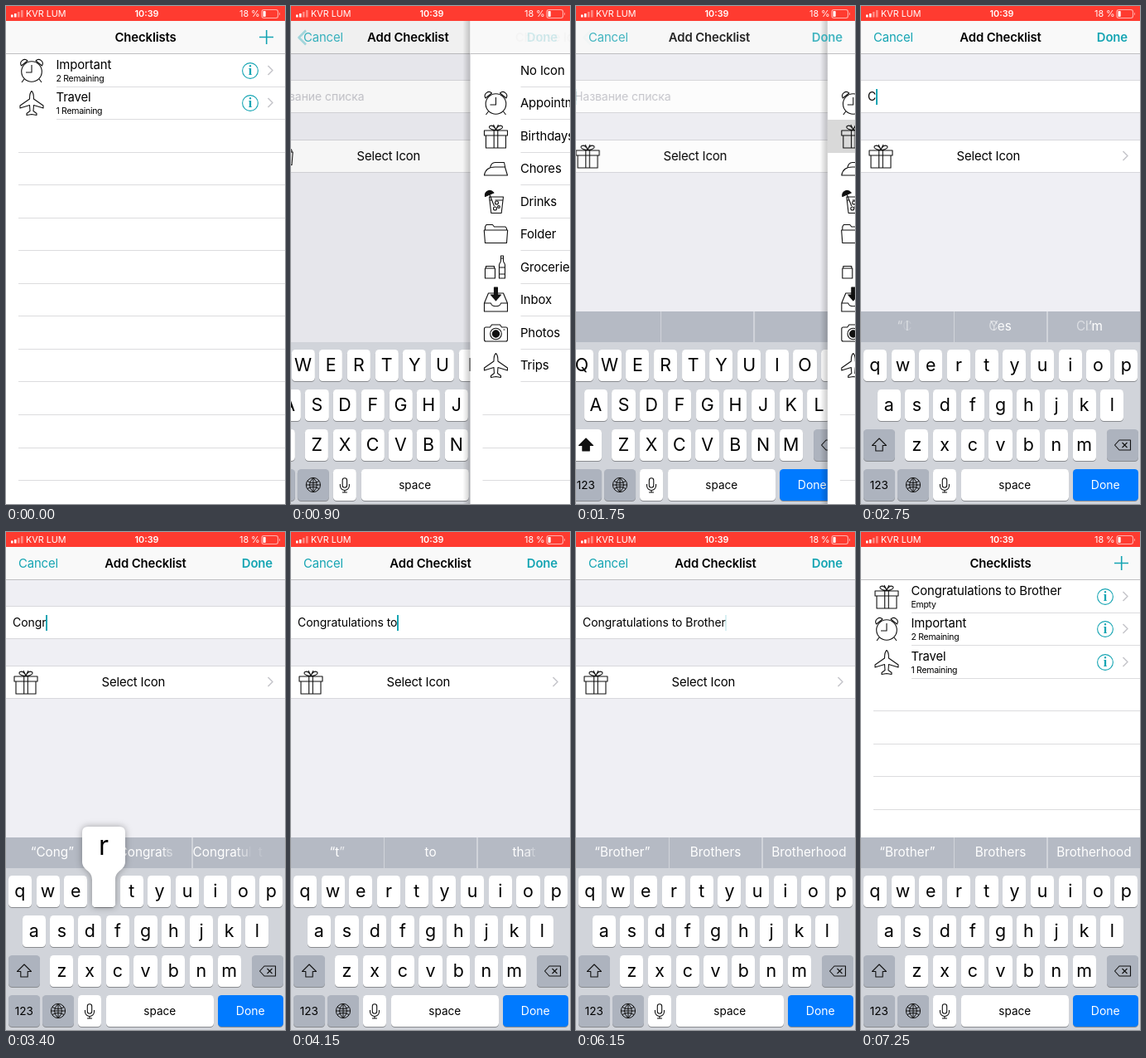
An HTML page for the animation above (7300 ms loop, 337 by 600 pixels).

```html
<!DOCTYPE html>
<html lang="en">
<head>
<meta charset="utf-8">
<title>Checklists</title>
<style>
html, body { margin: 0; width: 100%; height: 100%; overflow: hidden; background: #fff; }
#stage {
  position: relative; width: 337px; height: 600px; overflow: hidden; background: #fff; color: #000;
  font: 14.9px/20px Inter, "Open Sans", sans-serif; letter-spacing: -.14px;
  --tint: #16a5b3;
}
#stage div { position: absolute; box-sizing: border-box; white-space: pre; }
svg { position: absolute; overflow: visible; fill: none; stroke: #111; stroke-width: 1.1; stroke-linejoin: round; }
.solid { fill: #111; }

/* status bar */
#status { left: 0; top: 0; width: 337px; height: 18px; background: #ff3b30; color: #fff; font-size: 10.8px; line-height: 19px; letter-spacing: 0; }
#status div { top: 0; }
#status svg { left: 0; top: 0; stroke: none; fill: #fff; }

/* sliding pages */
.slide, #nav div { animation: 7300ms cubic-bezier(.25,.43,.25,1) infinite; }
.page { left: 0; top: 18px; width: 337px; height: 582px; background: #fff; }
.page::before { content: ""; position: absolute; left: -9px; top: 0; width: 9px; height: 100%; background: linear-gradient(90deg, #0000, #0003); }
.bar { left: 0; top: 0; width: 337px; height: 40px; background: #f9f9f9; border-bottom: 1px solid #bfbfc2; }
#list { animation-name: list; }
#add { animation-name: add; background: #efeff4; }
#icons { animation-name: icons; }
#kb { animation-name: kb; }
@keyframes list {
  0%, 2.055% { transform: none; filter: brightness(1); }
  8.219%, 90.411% { transform: translateX(-101px); filter: brightness(.9); }
  97.26%, 100% { transform: none; filter: brightness(1); }
}
@keyframes add {
  0%, 2.055% { transform: translateX(337px); visibility: hidden; }
  8.219%, 11.644% { transform: translateX(0); filter: brightness(1); visibility: visible; }
  15.89%, 20.548% { transform: translateX(-101px); filter: brightness(.9); visibility: visible; }
  26.712%, 90.411% { transform: translateX(0); filter: brightness(1); visibility: visible; }
  97.26%, 100% { transform: translateX(337px); visibility: hidden; }
}
@keyframes kb {
  0%, 2.055% { transform: translateX(337px); }
  8.219%, 11.644% { transform: translateX(0); }
  15.89%, 20.548% { transform: translateX(-101px); }
  26.712%, 100% { transform: translateX(0); }
}
@keyframes icons {
  0%, 11.644% { transform: translateX(337px); visibility: hidden; }
  15.89%, 20.548% { transform: translateX(0); visibility: visible; }
  26.712%, 100% { transform: translateX(337px); visibility: hidden; }
}

/* navigation bar items */
#nav { left: 0; top: 18px; width: 337px; height: 40px; line-height: 41px; color: var(--tint); }
#nav div { top: 0; height: 40px; }
#nav .title { left: 0; width: 337px; text-align: center; font-weight: 600; color: #000; }
#nav svg { stroke: var(--tint); }
#nav .l-title { animation-name: lTitle; }
#nav .l-plus { animation-name: lPlus; }
#nav .a-title { animation-name: aTitle; }
#nav .a-left { animation-name: aLeft; left: 15px; }
#nav .a-right { animation-name: aRight; right: 15px; font-weight: 600; }
#nav .i-title { animation-name: iTitle; }
#nav .i-back { animation-name: iBack; left: 23.5px; }
#nav .i-chev { animation-name: iChev; left: 8px; }
@keyframes lTitle {
  0%, 2.055% { transform: none; opacity: 1; }
  6% { opacity: 0; }
  8.219%, 90.411% { transform: translateX(-76px); opacity: 0; }
  97.26%, 100% { transform: none; opacity: 1; }
}
@keyframes lPlus { 0%, 2.055% { opacity: 1; } 5%, 92% { opacity: 0; } 97.26%, 100% { opacity: 1; } }
@keyframes aTitle {
  0%, 2.055% { transform: translateX(228px); opacity: 0; }
  8.219%, 11.644% { transform: none; }
  8.219%, 12.4% { opacity: 1; }
  15%, 21.5% { opacity: 0; }
  15.89%, 20.548% { transform: translateX(-76px); }
  26.712%, 90.411% { transform: none; opacity: 1; }
  94% { opacity: 0; }
  97.26%, 100% { transform: translateX(228px); opacity: 0; }
}
@keyframes aLeft { 0%, 2.055% { opacity: 0; } 8.219%, 12.2% { opacity: 1; } 14%, 22% { opacity: 0; } 26.712%, 90.411% { opacity: 1; } 94%, 100% { opacity: 0; } }
@keyframes aRight { 0%, 2.055% { opacity: 0; } 8.219%, 11.644% { opacity: 1; } 13.2%, 22% { opacity: 0; } 26.712%, 90.411% { opacity: 1; } 94%, 100% { opacity: 0; } }
@keyframes iTitle {
  0%, 11.644% { transform: translateX(228px); }
  0%, 12.3% { opacity: 0; }
  15.89%, 20.548% { transform: none; opacity: 1; }
  24% { opacity: 0; }
  26.712%, 100% { transform: translateX(228px); opacity: 0; }
}
@keyframes iBack {
  0%, 11.644% { transform: translateX(76px); }
  0%, 13.2% { opacity: 0; }
  15.89%, 20.548% { transform: none; opacity: 1; }
  23% { opacity: 0; }
  26.712%, 100% { transform: translateX(76px); opacity: 0; }
}
@keyframes iChev { 0%, 11.644% { opacity: 0; } 15.89%, 20.548% { opacity: 1; } 25%, 100% { opacity: 0; } }

/* table rows */
.row { left: 0; width: 337px; height: 40px; }
.row::after { content: ""; position: absolute; left: var(--inset, 15px); right: 0; bottom: 0; height: 1px; background: #dcdcde; }
.row svg { left: 15.5px; top: 5px; }
.row.on { background: #d9d9d9; }
.row .name { left: 60.5px; top: 10px; }
.row .name.up { top: 3px; }
.row .sub { left: 60.5px; top: 20px; font-size: 10.5px; letter-spacing: -.3px; }
svg.info { stroke: var(--tint); }
svg.info text { fill: var(--tint); stroke: none; font: bold 16px "Liberation Serif", serif; text-anchor: middle; }
svg.chev { stroke: #c7c7cc; stroke-width: 1.6; }
.cell { left: 0; width: 337px; height: 40px; background: #fff; border: solid #d8d8dc; border-width: 1px 0; }
#field, #hint { left: 8px; top: 9px; height: 20px; font-size: 14px; letter-spacing: -.06px; }
#hint { color: #c7c7cd; }
#caret { display: inline-block; width: 2px; height: 19px; vertical-align: middle; background: var(--tint); margin: -2px 0 0 -.5px; }

/* keyboard */
#kb { left: 0; top: 368px; width: 337px; height: 232px; letter-spacing: 0; }
#keys { left: 0; top: 37px; width: 337px; height: 195px; background: #d1d4da; }
#hints { left: 0; top: 0; width: 337px; height: 38px; background: #d1d4da; }
.slot { top: 0; width: 111.6px; height: 37px; background: #b5bac4; color: #fff; font-size: 15.3px; }
.slot.auto { background: #e8eaee; color: #007aff; }
.slot div { inset: 0; text-align: center; line-height: 35px; }
.key { height: 38px; border-radius: 4.5px; background: #fff; box-shadow: 0 1px 0 #898b8f; text-align: center; line-height: 36px; font-size: 21.4px; }
.key.dark { background: #adb3be; }
.key.word { font-size: 13.6px; line-height: 38px; }
.key svg { left: 50%; top: 50%; }
#pop { width: 0; height: 0; }
#pop svg { fill: #fff; stroke: none; filter: drop-shadow(0 0 4px #0005); }
#pop div { left: -26px; top: -57px; width: 52px; line-height: 42px; text-align: center; font-size: 32px; }
</style>
</head>
<body>
<div id="stage">
  <div id="list" class="page slide"></div>
  <div id="add" class="page slide">
    <div class="bar"></div>
    <div class="cell" style="top:71px"><div id="hint">Название списка</div><div id="field"><span id="typed"></span><span id="caret"></span></div></div>
    <div class="cell" style="top:143px"><div style="left:115.5px;top:9px">Select Icon</div><div id="picked" style="left:9px;top:4px"></div></div>
  </div>
  <div id="kb" class="slide"><div id="hints"></div><div id="keys"></div><div id="pop"></div></div>
  <div id="icons" class="page slide"></div>
  <div id="nav">
    <div class="title l-title">Checklists</div>
    <div class="l-plus" style="left:306px"><svg width="18" height="18" style="top:11px;stroke-width:1.6"><path d="M8.7 0v17M0 8.5h17"/></svg></div>
    <div class="title a-title">Add Checklist</div>
    <div class="a-left">Cancel</div>
    <div class="a-right">Done</div>
    <div class="title i-title">Choose Icon</div>
    <div class="i-back">Add Checklist</div>
    <div class="i-chev"><svg width="12" height="20" style="top:11px;stroke-width:2.6"><path d="M10 .5L1.5 9 10 17.5"/></svg></div>
  </div>
  <div id="status">
    <svg width="337" height="18"><path d="M6 10.5h2.6v3H6zM10 9h2.6v4.5H10z"/><path opacity=".4" d="M14 7h2.6v6.5H14zM18 5h2.6v8.5H18z"/><rect x="310.5" y="6" width="3.2" height="7" rx=".8"/><rect x="309" y="4.5" width="19.5" height="10" rx="2.5" fill="none" stroke="#fff" stroke-opacity=".6"/><path opacity=".6" d="M330 7.5q2 2 0 4z"/></svg>
    <div style="left:24px">KVR LUM</div>
    <div style="left:0;width:340px;text-align:center;font-weight:600">10:39</div>
    <div style="left:282px">18 %</div>
  </div>
</div>
<script>
const $ = id => document.getElementById(id);
const LOOP = 7300;
const svg = (body, size = 30, cls = '', style = '') =>
  `<svg class="${cls}" width="${size}" height="${size}" style="${style}">${body}</svg>`;
const path = (d, cls = '') => `<path class="${cls}" d="${d}"/>`;
const circle = (x, y, r, cls = '') => `<circle class="${cls}" cx="${x}" cy="${y}" r="${r}"/>`;

const art = {
  clock: circle(15, 16, 12.3) + path('M15 8v9H8M6 25l-3 4M24 25l3 4M2.5 9C-.5 4 6-1 10 3zM27.5 9C30.5 4 24-1 20 3z'),
  gift: path('M1 8h28v6H1zM3 14v15h24V14M12.7 8v21M17.3 8v21M15 7C9 8 5 4 8 2.5S14 5 15 7zM15 7c6 1 10-3 7-4.5S16 5 15 7zM15 7l-3-6M15 7l3-6'),
  iron: path('M1 23C2 16 7 13 14 13h12l3 10zM8 14c1-5 3-6.5 6-6.5h11l1.2 5.5'),
  drink: path('M7 9h17l-2.3 19.5H9.3zM7.6 13h3M14 13h9.5M7 5l6 15') + circle(16, 16, 2) + circle(14, 23, 2) + circle(18.5, 21, 1.4) + path('M2 8.5C1 2 8-1 12.5 4z', 'solid'),
  folder: path('M2 25.5L.8 10h28.4L28 25.5zM2 10V6l1.5-2.5H11L13 6h13.5L28 8v2'),
  food: path('M2 16h12v12H2zM3 13.5h10V16H3zM19 28V12c0-2 2-3 2-5V1h3v6c0 2 2 3 2 5v16zM21 4h3M19 15h7M19 23h7'),
  inbox: path('M1 19L6 7h18l5 12v10H1zM1 19h8c1 5 11 5 12 0h8') + path('M13 0h4v9h4l-6 7-6-7h4z', 'solid'),
  camera: path('M3 8h5l2-3h10l2 3h5q2 0 2 2v13q0 2-2 2H3q-2 0-2-2V10q0-2 2-2zM24 11h2') + circle(15, 16, 6.8) + circle(15, 16, 4.2, 'solid'),
  plane: path('M15 .5C13 2 12.5 5 12.5 10L1 18v3l11.5-3.5.5 7-4 3v2l6-1 6 1v-2l-4-3 .5-7L29 21v-3L17.5 10C17.5 5 17 2 15 .5z')
};
const icon = name => name ? svg(art[name]) : '';
const chevron = (x, y) => svg(path('M.5 0L6 5.5.5 11'), 8, 'chev', `left:${x}px;top:${y}px`);

function table(items) {
  let html = '<div class="bar"></div>';
  for (let i = 0; i < 14; i++) {
    const top = Math.round(39.5 + 39.55 * i);
    const [name, pic, sub] = items[i] || [];
    html += `<div class="row" style="top:${top}px;${name ? '--inset:61px' : ''}">`;
    if (name) html += icon(pic) + `<div class="name ${sub ? 'up' : ''}">${name}</div>`;
    if (sub) html += `<div class="sub">${sub}</div>` + chevron(316, 14) +
      svg(circle(10, 10, 9.4) + '<text x="10" y="15.3">i</text>', 20, 'info', 'left:284.5px;top:10px');
    html += '</div>';
  }
  return html;
}
const before = [['Important', 'clock', '2 Remaining'], ['Travel', 'plane', '1 Remaining']];
const lists = [before, [['Congratulations to Brother', 'gift', 'Empty'], ...before]].map(table);
$('icons').innerHTML = table([['No Icon'], ['Appointments', 'clock'], ['Birthdays', 'gift'], ['Chores', 'iron'],
  ['Drinks', 'drink'], ['Folder', 'folder'], ['Groceries', 'food'], ['Inbox', 'inbox'], ['Photos', 'camera'], ['Trips', 'plane']]);
$('add').lastElementChild.insertAdjacentHTML('beforeend', chevron(316, 13));

// keyboard
const keyAt = {}, letters = [];
function key(x, y, w, label, cls = '') {
  const el = document.createElement('div');
  el.className = 'key ' + cls;
  el.style.cssText = `left:${x}px;top:${y}px;width:${w}px`;
  el.innerHTML = label;
  $('keys').append(el);
  return el;
}
['qwertyuiop', 'asdfghjkl', 'zxcvbnm'].forEach((row, r) => [...row].forEach((c, i) => {
  const x = [16.9, 33.8, 67.4][r] + 33.7 * i, y = 9 + 48 * r;
  keyAt[c] = [x, y + 37];
  letters.push([c, key(x - 14.1, y, 28.2, c)]);
}));
const glyph = (body, extra = '') => svg(body, 20, '', 'margin:-10px;' + extra);
const shift = key(3, 105, 38, glyph(path('M10 2l8.5 8.5h-4.3V17H5.8v-6.5H1.5z')), 'dark');
key(297, 105, 37.5, glyph(path('M6 4h13.5v12H6L.5 10zM9.5 7l6 6M15.5 7l-6 6')), 'dark');
key(3, 153, 37.5, '123', 'dark word');
key(44, 153, 37.5, glyph(circle(10, 10, 8.6) + path('M10 1.4v17.2M1.4 10h17.2M3 5.5q7 4 14 0M3 14.5q7-4 14 0M10 1.4q-9 8.6 0 17.2M10 1.4q9 8.6 0 17.2'), 'stroke-width:1'), 'dark');
key(87, 153, 28.2, glyph(path('M7.3 4.5a2.7 2.7 0 0 1 5.4 0v6a2.7 2.7 0 0 1-5.4 0zM4.5 9v2a5.5 5.5 0 0 0 11 0V9M10 16.5V19M7 19h6')));
const space = key(121, 153, 129.5, 'space', 'word');
const done = key(256, 153, 78.5, 'Done', 'word');
done.style.cssText += 'background:#007aff;color:#fff;font-size:14px';

$('pop').innerHTML = svg(path('M-19-59H19q7 0 7 7v35C26-6 14-7 14 5v29q0 4-4 4h-20q-4 0-4-4V5C-14-7-26-6-26-17v-35q0-7 7-7z'), 1) + '<div></div>';
const slots = [0, 112.8, 225.6].map(x => {
  const el = document.createElement('div');
  el.className = 'slot';
  el.style.left = x + 'px';
  $('hints').append(el);
  return el;
});

// [time, text, hold]
const word = 'Congratulations';
const typing = [[0, '', 0]];
[2600, 2850, 3010, 3190, 3360, 3530].forEach((t, i) => typing.push([t, word.slice(0, i + 1), 110]));
typing.push([3700, word + ' ', 0]);
[3880, 4030, 4300, 4560, 4680, 4790, 4900, 5120, 5300, 5480].forEach((t, i) =>
  typing.push([t, word + ' ' + 'to Brother'.slice(0, i + 1), t === 4900 ? 190 : 90]));

// [time, three suggestions, middle one is the autocorrection]
const hints = [
  [0, ['', '', '']], [2090, ['I', 'Yes', 'I’m']],
  [2725, ['“C”', 'Can', 'Come']], [2900, ['“Co”', 'Come', 'Could']], [3070, ['“Con”', 'Concert', 'Contact']],
  [3250, ['“Cong”', 'Congrats', word]], [3420, ['“Congr”', 'Congrats', word]], [3590, ['“Congra”', word, 'Congrats']],
  [3760, ['on', 'to', 'for']], [4080, ['“t”', 'to', 'that']], [4220, ['“to”', 'too', 'top']], [4370, ['the', 'you', 'my']],
  [4620, ['“B”', 'But', 'By']], [4730, ['“Br”', 'Bro', 'Bring']], [4815, ['“Bro”', 'Bro', 'Brother']],
  [4905, ['“Brot”', 'Brit', 'Brother'], true], [5180, ['“Broth”', 'Brother', 'Broth']],
  [5360, ['“Brothe”', 'Brother', 'Brothers'], true], [5600, ['“Brother”', 'Brothers', 'Brotherhood']]
];
const current = (rows, t) => rows.findLastIndex(r => r[0] <= t);
const clamp = v => Math.max(0, Math.min(1, v));
const spans = s => [...s].map(c => `<span>${c}</span>`).join('');

const seen = {};
function once(name, value, act) {
  if (seen[name] !== value) { seen[name] = value; act(value); }
}

function drawHints(t) {
  const n = current(hints, t), [start, words, auto] = hints[n];
  once('hint', n, () => slots.forEach((el, i) => {
    el.innerHTML = `<div>${spans(n ? hints[n - 1][1][i] : '')}</div><div>${spans(words[i])}</div>`;
    el.classList.toggle('auto', !!auto && i === 1);
  }));
  // letters swap one after another
  for (const el of slots) [...el.children].forEach((line, fresh) => [...line.children].forEach((s, i) => {
    const p = clamp((t - start - 18 * i) / 50);
    s.style.opacity = fresh ? p : 1 - p;
  }));
}

function blink(t) {
  for (const [off, on] of [[2100, 2350], [6050, 6300]])
    if (t >= off && t < on + 150) return t < on ? 1 - clamp((t - off) / 120) : clamp((t - on) / 150);
  return 1;
}

function draw(t) {
  const [start, text, hold] = typing[current(typing, t)];
  once('text', text, s => {
    $('typed').textContent = s;
    $('hint').style.display = s ? 'none' : '';
  });
  $('caret').style.opacity = blink(t);

  const upper = t < 2700 || (t >= 4450 && t < 4650);
  once('upper', upper, up => {
    for (const [c, el] of letters) el.textContent = up ? c.toUpperCase() : c;
    shift.classList.toggle('dark', !up);
    shift.querySelector('path').style.fill = up ? '#111' : 'none';
  });

  const char = t < start + hold ? text.slice(-1) : '';
  once('press', char, c => {
    const at = keyAt[c.toLowerCase()];
    space.classList.toggle('dark', c === ' ');
    $('pop').style.display = at ? '' : 'none';
    if (!at) return;
    $('pop').style.left = at[0] + 'px';
    $('pop').style.top = at[1] + 'px';
    $('pop').lastElementChild.textContent = c;
  });

  once('bar', t >= 1500, on => $('hints').style.display = on ? '' : 'none');
  once('picked', t < 1500 ? 'folder' : 'gift', name => $('picked').innerHTML = icon(name));
  once('chosen', t >= 1500 && t < 2000, on => $('icons').querySelectorAll('.row')[2].classList.toggle('on', on));
  once('list', t < 3000 ? 0 : 1, i => $('list').innerHTML = lists[i]);
  drawHints(t);
}

let zero;
function tick(now) {
  zero ??= now;
  draw((now - zero) % LOOP);
  requestAnimationFrame(tick);
}
draw(0);
requestAnimationFrame(tick);
</script>
</body>
</html>
```
